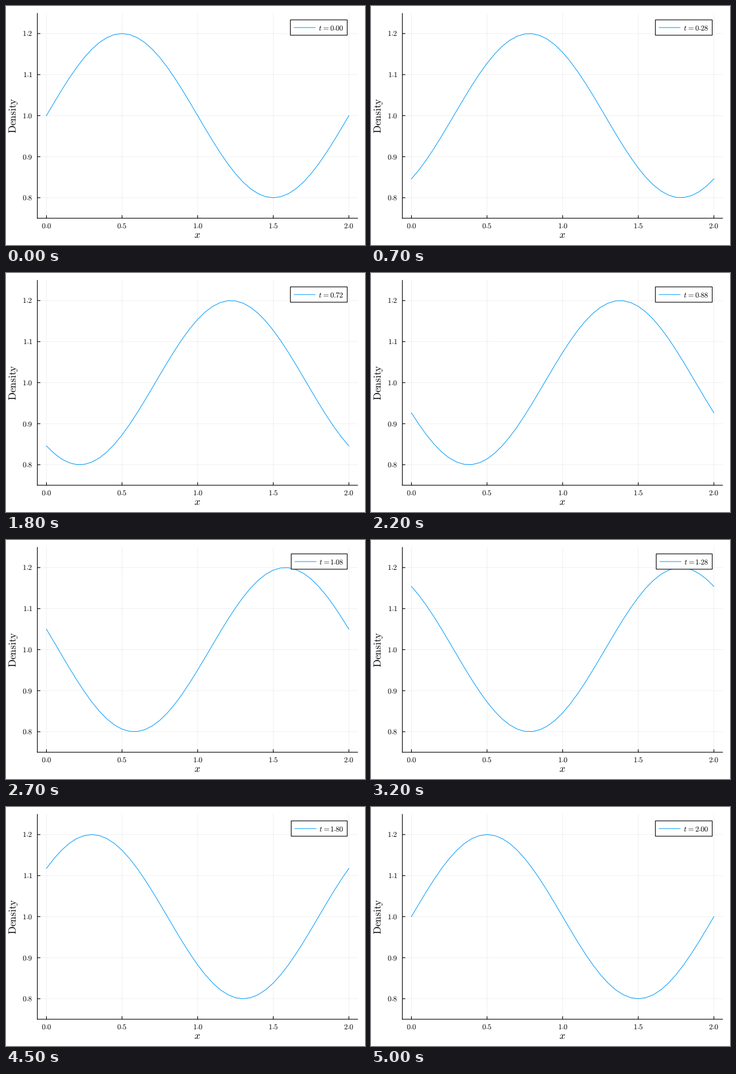
Write a matplotlib script that moves like this. It is 600 by 400 pixels and loops after 5.2 s.

```python
import numpy as np
import matplotlib.pyplot as plt
from matplotlib.animation import FuncAnimation
from matplotlib.patches import Rectangle

W, H, DPI = 600, 400, 100
PT = 72 / DPI              # points per pixel
STEPS = 50                 # time runs from 0 to 2 in this many steps
BLUE = "#009afa"
SMALL, LARGE = 12.5 * PT, 17.3 * PT

plt.rcParams.update({"mathtext.fontset": "cm", "text.hinting": "none",
                     "path.snap": False})

# Plot area in pixels, and the data range it shows
LEFT, RIGHT, TOP, BOTTOM = 52.4, 588.2, 11.8, 355.2
X_MIN, X_MAX, Y_MIN, Y_MAX = -0.06, 2.06, 0.75, 1.25


def px(x):
    return LEFT + (RIGHT - LEFT) * (x - X_MIN) / (X_MAX - X_MIN)


def py(y):
    return BOTTOM - (BOTTOM - TOP) * (y - Y_MIN) / (Y_MAX - Y_MIN)


fig = plt.figure(figsize=(W / DPI, H / DPI), dpi=DPI, facecolor="white")
ax = fig.add_axes([0, 0, 1, 1])
ax.set(xlim=(0, W), ylim=(H, 0))
ax.axis("off")


def line(x0, y0, x1, y1, width=1.1, **style):
    style = {"color": "black", "solid_capstyle": "butt", **style}
    return ax.plot([x0, x1], [y0, y1], lw=width * PT, **style)[0]


def label(x, y, tex, size=SMALL, **style):
    return ax.text(x, y, f"${tex}$", fontsize=size, va="baseline", **style)


# Grid, ticks and tick labels
for x in np.arange(0, 2.1, 0.5):
    line(px(x), TOP, px(x), BOTTOM, 1, alpha=0.06, zorder=1)
    line(px(x), BOTTOM, px(x), BOTTOM - 5, zorder=2)
    label(px(x), 371.3, f"{x:.1f}", ha="center")
for y in np.arange(0.8, 1.25, 0.1):
    line(LEFT, py(y), RIGHT, py(y), 1, alpha=0.06, zorder=1)
    line(LEFT, py(y), LEFT + 5, py(y), zorder=2)
    label(44.6, py(y) + 4.2, f"{y:.1f}", ha="right")

# Axis lines and titles
line(LEFT, TOP, LEFT, BOTTOM + 0.5, zorder=2)
line(LEFT - 0.5, BOTTOM, RIGHT, BOTTOM, zorder=2)
label(319.8, 388.3, "x", LARGE, ha="center")
label(17, 183, r"\mathrm{Density}", LARGE, ha="center",
      rotation=90, rotation_mode="anchor")

grid_x = np.linspace(0, 2, 41)
curve, = ax.plot([], [], color=BLUE, lw=PT, zorder=3)

# Legend, drawn over the curve
BOX_X, BOX_W, KEY_X, NAME_X = 475.3, 95, np.array([481, 517.3]), 522
box = Rectangle((BOX_X, 23.2), BOX_W, 25.7, fc="white", ec="black",
                lw=1.1 * PT, zorder=4)
ax.add_patch(box)
key = line(*KEY_X[[0]], 36.1, *KEY_X[[1]], 36.1, 1, color=BLUE, zorder=5)
name = label(NAME_X, 40.4, r"t\hspace{0.08}=", ha="left", zorder=5)
value = label(564.8, 40.4, "0.00", ha="right", zorder=5)


def update(i):
    t = 2 * min(i, STEPS) / STEPS
    curve.set_data(px(grid_x), py(1 + 0.2 * np.sin(np.pi * (grid_x - t))))

    # A leading 1 is narrower, so the legend shrinks from the left
    text = f"{t:.2f}"
    shift = 1.4 if text[0] == "1" else 0
    box.set_x(BOX_X + shift)
    box.set_width(BOX_W - shift)
    key.set_xdata(KEY_X + shift)
    name.set_x(NAME_X + shift)
    value.set_text(f"${text}$")
    return curve, box, key, name, value


anim = FuncAnimation(fig, update, frames=STEPS + 2, interval=100,
                     repeat=True, repeat_delay=0, blit=False)
plt.show()
```
